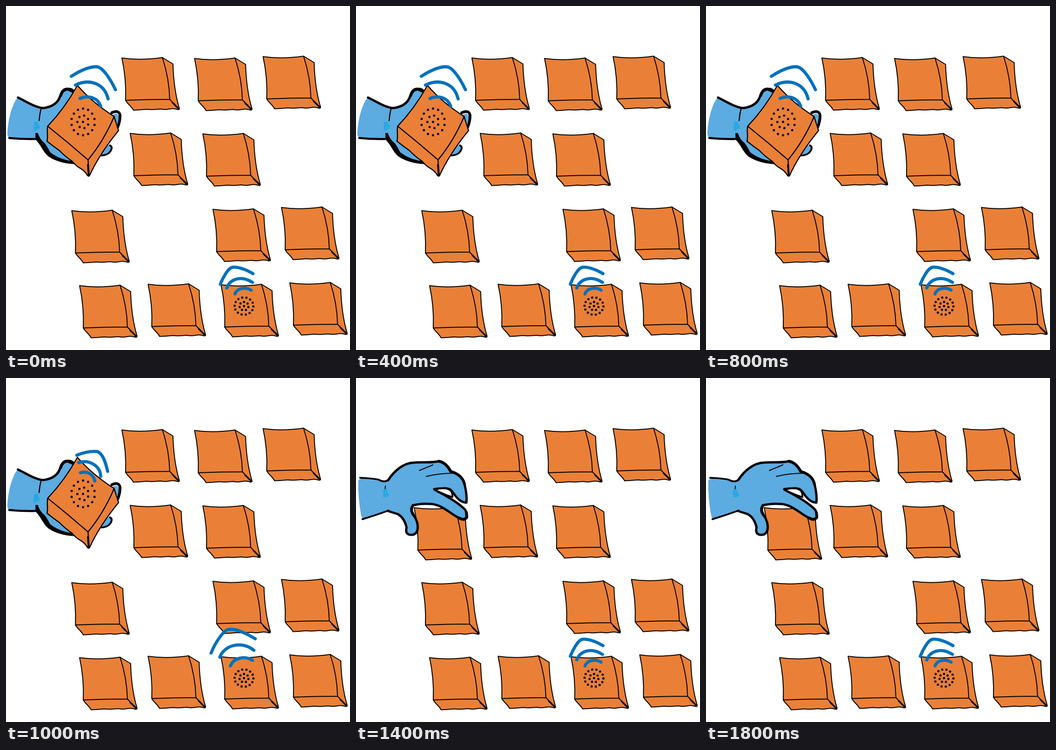
An HTML page with a canvas that plays this animation: 748 by 748 pixels, repeating every 2 s.

```html
<!DOCTYPE html>
<html lang="en">
<head>
<meta charset="utf-8">
<style>
  html, body { margin: 0; width: 100%; height: 100%; overflow: hidden; background: #fff; }
  canvas { display: block; }
</style>
</head>
<body>
<canvas id="stage" width="748" height="748"></canvas>
<script>
const ctx = document.getElementById('stage').getContext('2d');
const ORANGE = '#ea8037', BLUE = '#5cabe1', CYAN = '#29a9e1', WAVE = '#0071bc';
const STEP = 200, STEPS = 10;

function fill(d, color) {
  ctx.fillStyle = color;
  ctx.fill(new Path2D(d));
}

function line(d, width, color = '#000') {
  ctx.strokeStyle = color;
  ctx.lineWidth = width;
  ctx.stroke(new Path2D(d));
}

// Brick paths are relative to the top left corner of the front face.
const brick = {
  body: 'M0 0Q40 6 88 -1Q101 7 111 13C112 47 116 80 125 110Q125 113 121 112' +
    'Q113 109 103 111Q94 113 84 111Q66 113 54 111.5Q40 113 25 113.5C20 104 13 101 8 92Q10 46 0 0Z',
  edges: 'M88 -1Q103 45 104 90M8 92Q56 90 104 90L124 111',
  crease: 'M110 97L123 110'
};

function drawBrick(x, y, angle = 0, scale = 1) {
  ctx.save();
  ctx.translate(x, y);
  ctx.rotate(angle);
  ctx.scale(scale, scale);
  fill(brick.body, ORANGE);
  line(brick.body, 2);
  line(brick.edges, 2);
  line(brick.crease, 3.5);
  ctx.restore();
}

function dotRing(cx, cy, rx, ry, count, start) {
  ctx.fillStyle = '#000';
  for (let i = 0; i < count; i++) {
    const a = start + i * 2 * Math.PI / count;
    ctx.beginPath();
    ctx.arc(cx + rx * Math.cos(a), cy + ry * Math.sin(a), 2.5, 0, 7);
    ctx.fill();
  }
}

function drawSpeaker(cx, cy, rx, ry, start) {
  dotRing(cx, cy, rx, ry, 14, start);
  dotRing(cx, cy, rx * 0.48, ry * 0.48, 7, start + 0.2);
  dotRing(cx, cy, 0, 0, 1, 0);
}

const bricks = [
  [252, 113], [410, 114], [559, 110], [270, 277], [428, 278], [143, 445],
  [450, 442], [599, 438], [160, 608], [309, 605], [467.5, 606], [617, 602]
];

function drawHeldBrick() {
  fill('M22 203Q27 199 34 202L75 223Q105 222 116 204Q121 181 134 182L150 187L150 341' +
    'Q119 338 96 322C84 312 78 298 70 288Q40 290 10 288Q2 285 3 275C5 246 11 222 22 203Z', BLUE);
  fill('M230 238Q241 230 245 239L244 258ZM222 303Q233 303 227 315Q219 325 208 322Z', BLUE);
  line('M26 199C43 207 64 221 81 222C104 219 114 209 118 195Q123 179 135 180Q145 180 149 188', 5);
  line('M119 195Q123 180 135 181L146 186', 6);
  line('M7 287Q40 290 65 289', 4.5);
  fill('M64 276L69 276Q74 291 84 298Q90 306 96 318Q118 335 150 338L150 344' +
    'Q114 342 92 327C80 317 76 302 64 290Z', '#000');
  line('M76 224Q73 236 72 249', 2.5);
  line('M230 232Q246 225 248 238Q248 251 243 263', 6);
  line('M226 303Q233 306 227 316Q221 325 206 325', 4);
  fill('M61 252L70 251L69 257L74 260L73 267L66 268L65 272L60 271Z', CYAN);
  drawBrick(155.3, 172.5, 41 * Math.PI / 180, 1.19);
  drawSpeaker(167.5, 252, 25.5, 29, -Math.PI / 2);
}

function drawPlacingHand() {
  drawBrick(126.5, 282);
  const hand = 'M70 222C83 202 103 185 125 184C145 182 164 185 180 181Q194 181 205 203' +
    'Q232 211 236 231Q242 255 240 271Q225 271 211 249Q204 238 190 240Q177 240 170 242' +
    'C194 256 216 266 237 286Q243 295 240 305Q233 309 225 305C204 295 190 277 165 274' +
    'Q141 272 124 277Q117 286 125 298Q136 313 134 329Q131 342 119 341Q106 340 110 325' +
    'Q105 304 91 296Q78 292 69 289';
  fill(hand + 'Z', BLUE);
  fill('M5 223Q7 219 14 219L64 225L72 221L72 289Q42 297 18 305Q12 306 11 298Q4 260 5 223Z', BLUE);
  line(hand, 5);
  line('M9 217Q32 218 49 221Q63 229 72 220', 4);
  line('M14 307Q47 297 71 288', 4);
  line('M180 181Q196 184 206 203Q232 211 236 231', 6);
  line('M124 277Q117 286 125 298M224 304Q235 311 241 303L240 293', 6);
  fill('M174 244Q200 237 207 251L207 256Q190 251 174 244Z', '#fff');
  line('M170 242Q204 234 209 251L210 259Q190 253 170 242', 3.5);
  line('M138 201L167 189M153 214Q181 207 214 207', 2.2);
  line('M64 235L63 243', 2);
  fill('M59 243L67 240L68 248L72 254L69 259L59 259Z', CYAN);
}

const waves = {
  leftWide: 'M142 153Q174 132 197 132C211 133 228 161 238 182' +
    'M151 172C181 157 214 168 222 202M161 201C180 193 200 200 206 218',
  leftTight: 'M154 168Q178 158 199 160C211 165 217 185 221 203' +
    'M158 184C180 177 205 190 206 214M162 206C175 202 190 208 193 224',
  rightTight: 'M466 605C471 592 483 569 493 568C507 567 525 575 537 582' +
    'M480 613C488 592 513 586 536 601M498 626C503 612 522 611 533 618',
  rightWide: 'M446 598C455 575 473 549 483 547C500 544 521 555 542 567' +
    'M465 607C475 580 513 571 539 592M488 626C495 608 520 603 536 614'
};

function drawWaves(name, dx = 0, dy = 0) {
  ctx.save();
  ctx.translate(dx, dy);
  line(waves[name], 6.8, WAVE);
  ctx.restore();
}

function draw(step) {
  const held = step < 6;
  const odd = step % 2 === 1;
  ctx.fillStyle = '#fff';
  ctx.fillRect(0, 0, 748, 748);
  ctx.lineCap = ctx.lineJoin = 'round';
  for (const [x, y] of bricks) drawBrick(x, y);
  drawSpeaker(517.5, 652.5, 20.5, 18.8, -1.76);

  if (held) {
    drawHeldBrick();
    drawWaves(odd ? 'leftTight' : 'leftWide');
    drawWaves(odd ? 'rightWide' : 'rightTight');
  } else {
    drawPlacingHand();
    if (odd) drawWaves('rightTight');
    else drawWaves('rightWide', -8, 2);
  }
}

const start = performance.now();
function tick() {
  draw(Math.floor((performance.now() - start) / STEP) % STEPS);
  requestAnimationFrame(tick);
}
tick();
</script>
</body>
</html>
```
